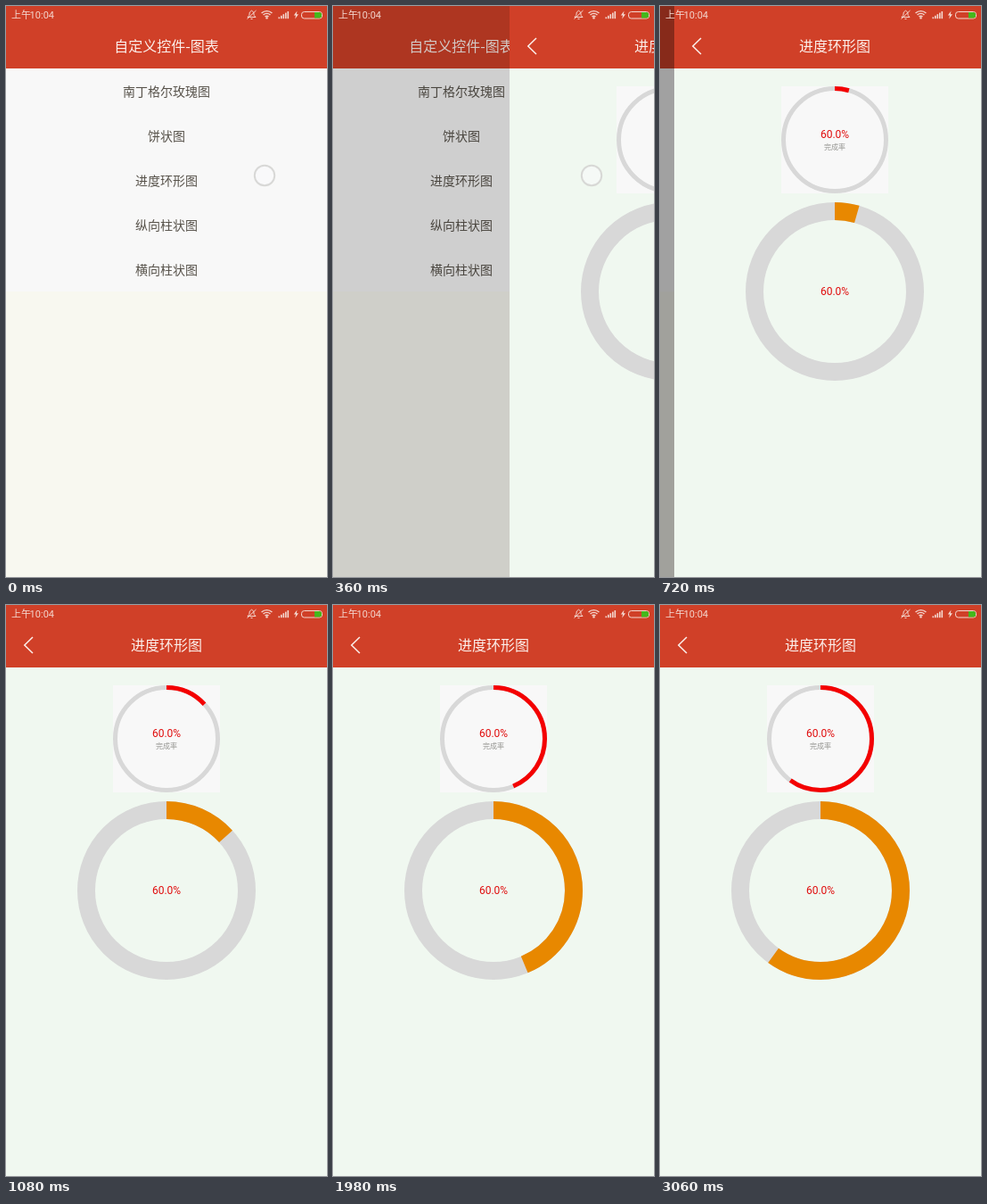
These frames come from a looping animation (360x640 px, 3.42 s). An HTML page with a canvas:

```html
<!DOCTYPE html>
<html lang="zh-CN">
<head>
<meta charset="utf-8">
<title>进度环形图</title>
<style>
  html, body { margin: 0; width: 100%; height: 100%; overflow: hidden; background: #f0f8f0; }
  canvas { display: block; width: 360px; height: 640px; }
</style>
</head>
<body>
<canvas id="stage" width="360" height="640"></canvas>
<script>
const ctx = document.getElementById('stage').getContext('2d');
const W = 360, H = 640, BAR = 70;
const LOOP = 3420, STEP = 180, LAST = 3060;
const CJK = '"Noto Sans CJK SC", "Noto Sans CJK", sans-serif';
const LATIN = 'Roboto, sans-serif';
const ROWS = ['南丁格尔玫瑰图', '饼状图', '进度环形图', '纵向柱状图', '横向柱状图'];

const clamp = v => Math.min(1, Math.max(0, v));

function rect(x, y, w, h, color) {
  ctx.fillStyle = color;
  ctx.fillRect(x, y, w, h);
}

function text(str, x, y, size, color, family = CJK, align = 'center') {
  ctx.font = `${size}px ${family}`;
  ctx.textAlign = align;
  ctx.fillStyle = color;
  ctx.fillText(str, x, y);
}

function line(points, color, width) {
  ctx.beginPath();
  points.forEach(([x, y]) => ctx.lineTo(x, y));
  ctx.strokeStyle = color;
  ctx.lineWidth = width;
  ctx.stroke();
}

function arc(x, y, r, from, to, color, width) {
  ctx.beginPath();
  ctx.arc(x, y, r, from, to);
  ctx.strokeStyle = color;
  ctx.lineWidth = width;
  ctx.stroke();
}

function header(title) {
  rect(0, 0, W, BAR, '#d04028');
  text(title, 180, 51, 16, '#fcf0ec');
}

function listPage() {
  rect(0, 0, W + 80, H, '#f8f8f0');
  rect(0, BAR, W + 80, 250, '#f8f8f8');
  header('自定义控件-图表');
  ROWS.forEach((row, i) => text(row, 180, 101 + i * 50, 14, '#57524a'));
}

function ring(y, outer, width, color, sweep) {
  const r = outer - width / 2, top = -Math.PI / 2;
  arc(180, y, r, 0, Math.PI * 2, '#d8d8d8', width);
  if (sweep > 0) arc(180, y, r, top, top + sweep, color, width);
}

function chartPage(sweep) {
  rect(0, 0, W, H, '#f0f8f0');
  header('进度环形图');
  line([[30, 36], [20.8, 45], [30, 54]], '#fcf0ec', 1.5);
  rect(120, 90, 120, 120, '#f8f8f8');
  ring(150, 60, 5, '#f40000', sweep);
  ring(320, 100, 20, '#e88800', sweep);
  text('60.0%', 180, 148, 12, '#e00c0c', LATIN);
  text('完成率', 180, 161, 8, '#949490');
  text('60.0%', 180, 324, 12, '#e00c0c', LATIN);
}

function statusBar() {
  const ink = '#f4d8d0';
  text('上午', 6, 14, 11, ink, CJK, 'left');
  text('10:04', 54, 14, 11, ink, LATIN, 'right');

  // muted bell
  line([[271, 12.5], [272.8, 10.5], [273.3, 7], [275.5, 5.2], [277.7, 7], [278.2, 10.5], [280, 12.5], [271, 12.5]], ink, 1);
  line([[274.5, 14.5], [276.5, 14.5]], ink, 1);
  line([[270.5, 14.5], [280.5, 5]], ink, 1);

  // wifi
  [2.8, 5.6, 8.4].forEach(r => arc(292.5, 14, r, -Math.PI * 0.75, -Math.PI * 0.25, ink, 1.4));
  ctx.beginPath();
  ctx.arc(292.5, 13.4, 1.2, 0, Math.PI * 2);
  ctx.fillStyle = ink;
  ctx.fill();

  // signal
  for (let i = 0; i < 5; i++) rect(305.5 + i * 2.5, 12.4 - i * 1.6, 1.6, 1.8 + i * 1.6, ink);

  // charging bolt
  ctx.beginPath();
  [[326.5, 5.5], [322.8, 10.6], [325, 10.6], [324.2, 14.5], [328, 9.2], [325.8, 9.2]]
    .forEach(([x, y]) => ctx.lineTo(x, y));
  ctx.fill();

  // battery
  ctx.beginPath();
  ctx.roundRect(331.5, 6.5, 23, 7.5, 3);
  ctx.strokeStyle = ink;
  ctx.lineWidth = 1;
  ctx.stroke();
  ctx.beginPath();
  ctx.roundRect(346, 7, 8, 6.5, [0, 2.5, 2.5, 0]);
  ctx.fillStyle = '#44b81c';
  ctx.fill();
}

function touch() {
  ctx.beginPath();
  ctx.arc(290, 190, 11.2, 0, Math.PI * 2);
  ctx.fillStyle = 'rgba(250,250,252,0.55)';
  ctx.fill();
  ctx.strokeStyle = 'rgba(210,210,208,0.85)';
  ctx.lineWidth = 2;
  ctx.stroke();
}

function draw(t) {
  const rest = (1 - clamp((t - 184) / 682)) ** 2;
  const slide = 1 - rest;
  const grow = 0.5 - 0.5 * Math.cos(Math.PI * clamp((t - 255) / 2650));
  const sweep = t < 720 ? 0 : grow * 0.6 * Math.PI * 2;

  if (rest > 0) {
    ctx.save();
    ctx.translate(-80 * slide, 0);
    listPage();
    ctx.restore();
    rect(0, 0, W, H, `rgba(0,0,0,${0.37 * slide})`);
  }
  if (slide > 0) {
    ctx.save();
    ctx.translate(Math.round(W * rest), 0);
    chartPage(sweep);
    ctx.restore();
  }
  statusBar();
  if (t < 540) touch();
}

const start = performance.now();
function tick() {
  const t = (performance.now() - start) % LOOP;
  draw(Math.min(LAST, Math.floor(t / STEP) * STEP));
  requestAnimationFrame(tick);
}
tick();
</script>
</body>
</html>
```
